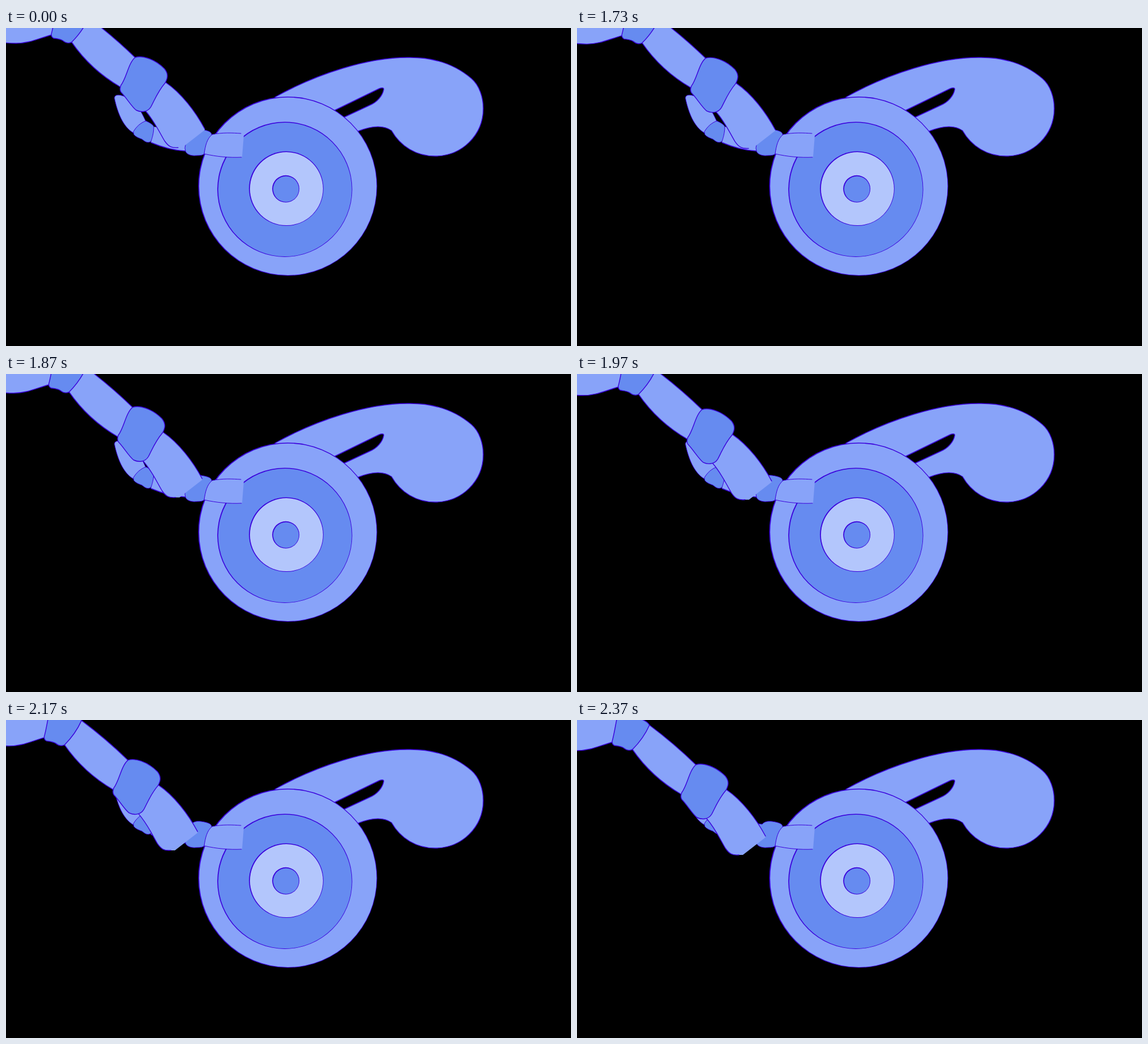
An HTML page that plays this animation: 998x561 px, repeating every 5.01 s.

```html
<!DOCTYPE html>
<html lang="en">
<head>
<meta charset="utf-8">
<title>Whistle and arm</title>
<style>
  html, body { margin: 0; width: 100%; height: 100%; overflow: hidden; background: #000; }
  svg { display: block; width: 100%; height: 100%; }
  .line { fill: none; stroke: #3a00dc; stroke-width: 1.4; stroke-linecap: round; stroke-linejoin: round; }
  .thin { stroke-width: 1; }
  .light { fill: #88a3f9; }
  .dark { fill: #668bf0; }
  .pale { fill: #b3c6fc; }
  .rim { fill: #3a00dc; }
  .hole { fill: #000; }
</style>
</head>
<body>
<svg id="stage" viewBox="0 0 998 561">
  <g id="whistle"></g>
  <g id="hand"></g>
  <g id="arm"></g>
</svg>
<script>
const NS = 'http://www.w3.org/2000/svg';
const LOOP = 5010;
const FPS = 30;
const FIRST = 51, LAST = 71;   // frames between which the arm slides
const SHIFT = [-18, 27];

const whistle = document.getElementById('whistle');
const hand = document.getElementById('hand');
const arm = document.getElementById('arm');

function add(parent, tag, attrs) {
  const el = document.createElementNS(NS, tag);
  for (const key in attrs) el.setAttribute(key, attrs[key]);
  parent.appendChild(el);
}
const fill = (parent, tone, d) => add(parent, 'path', { class: tone, d });
const line = (parent, d, extra = '') => add(parent, 'path', { class: 'line ' + extra, d });
function shape(parent, tone, d, extra) {
  fill(parent, tone, d);
  line(parent, d, extra);
}
// A disc whose rim is heavier at the upper left.
function disc(cx, cy, r, tone) {
  add(whistle, 'circle', { class: 'rim', cx, cy, r: r + 0.8 });
  add(whistle, 'circle', { class: tone, cx: cx + 0.4, cy: cy + 0.3, r: r - 0.5 });
}

// Whistle
shape(whistle, 'light', 'M475 122C550 80 640 52 709 52C760 51 795 66 822 89C836 101 843 122 843 142' +
  'C843 189 805 226 758 226C725 226 697 209 681 181C668 172 650 171 622 182L560 210Z');
shape(whistle, 'hole', 'M570 150L581 145L659 107C664 105 668 105 667 109C665 120 655 131 643 136L598 157L580 166Z');
disc(497.5, 279, 157.2, 'light');
disc(492.4, 284.7, 118.4, 'dark');
disc(495, 283.3, 65, 'pale');
disc(494.2, 283.8, 23.2, 'dark');

// Resting thumb and finger
shape(hand, 'light', 'M225 185C206 174 197 148 192 126C190 119 196 117 204 119C225 125 236 140 247 165Z', 'thin');
fill(hand, 'light', 'M260 174L322 183L317 217C295 216 275 210 256 202Z');
line(hand, 'M256 202C275 210 295 216 317 217');
shape(hand, 'dark', 'M225 183C230 174 238 167 247 164C254 167 260 171 261 174C261 185 258 195 256 200' +
  'C250 204 245 200 240 196C234 194 228 191 226 188Z', 'thin');
shape(hand, 'dark', 'M321 183L327 184C331 179 337 178 345 179C352 180 360 182 362 185Q364 187 363 190' +
  'C356 198 353 208 350 222Q348 225 336 225C326 226 318 222 317 217Q315 212 317 206Z', 'thin');
fill(hand, 'light', 'M364 188C382 184 400 185 415 186L420 190L417 228C394 229 372 227 350 222C352 208 355 195 364 188Z');
line(hand, 'M415 186C400 185 382 184 364 188C355 195 352 208 350 222C372 227 394 229 416 228', 'thin');

// Sliding arm
fill(arm, 'light', 'M-40 -60H95L81 12C58 18 42 27 18 27Q-10 27 -40 18Z');
line(arm, 'M81 12C58 18 42 27 18 27Q-10 27 -40 18');
fill(arm, 'light', 'M146 -18Q190 15 228 52L202 104Q150 74 116 25Z');
line(arm, 'M146 -18Q190 15 228 52');
line(arm, 'M116 25Q150 74 202 104');
shape(arm, 'dark', 'M92 -45C87 -27 85 -7 80 11Q80 16 84 18C90 19 95 19 100 22C106 27 112 27 116 25' +
  'C127 14 138 0 146 -18C143 -24 136 -27 128 -30Z');
fill(arm, 'light', 'M282 96C310 115 335 148 351 178V180L311 211H304C292 212 287 209 280 199' +
  'C270 182 262 164 247 147L250 115Z');
line(arm, 'M282 96C310 115 335 148 351 178');
line(arm, 'M304 211C292 212 287 209 280 199C270 182 262 164 247 147');
shape(arm, 'dark', 'M228 52C240 48 262 54 280 72C287 81 286 88 281 97C268 112 262 128 256 139' +
  'C250 149 238 149 230 145C222 139 212 122 203 113Q200 108 203 101C213 88 216 62 228 52Z');

function draw(ms) {
  // Small lead so that steps land on the 10 ms grid.
  const frame = Math.floor((ms + 3.4) * FPS / 1000);
  const p = Math.min(1, Math.max(0, (frame - FIRST) / (LAST - FIRST)));
  arm.setAttribute('transform', `translate(${SHIFT[0] * p} ${SHIFT[1] * p})`);
}

const start = performance.now();
function tick() {
  draw((performance.now() - start) % LOOP);
  requestAnimationFrame(tick);
}
tick();
</script>
</body>
</html>
```
